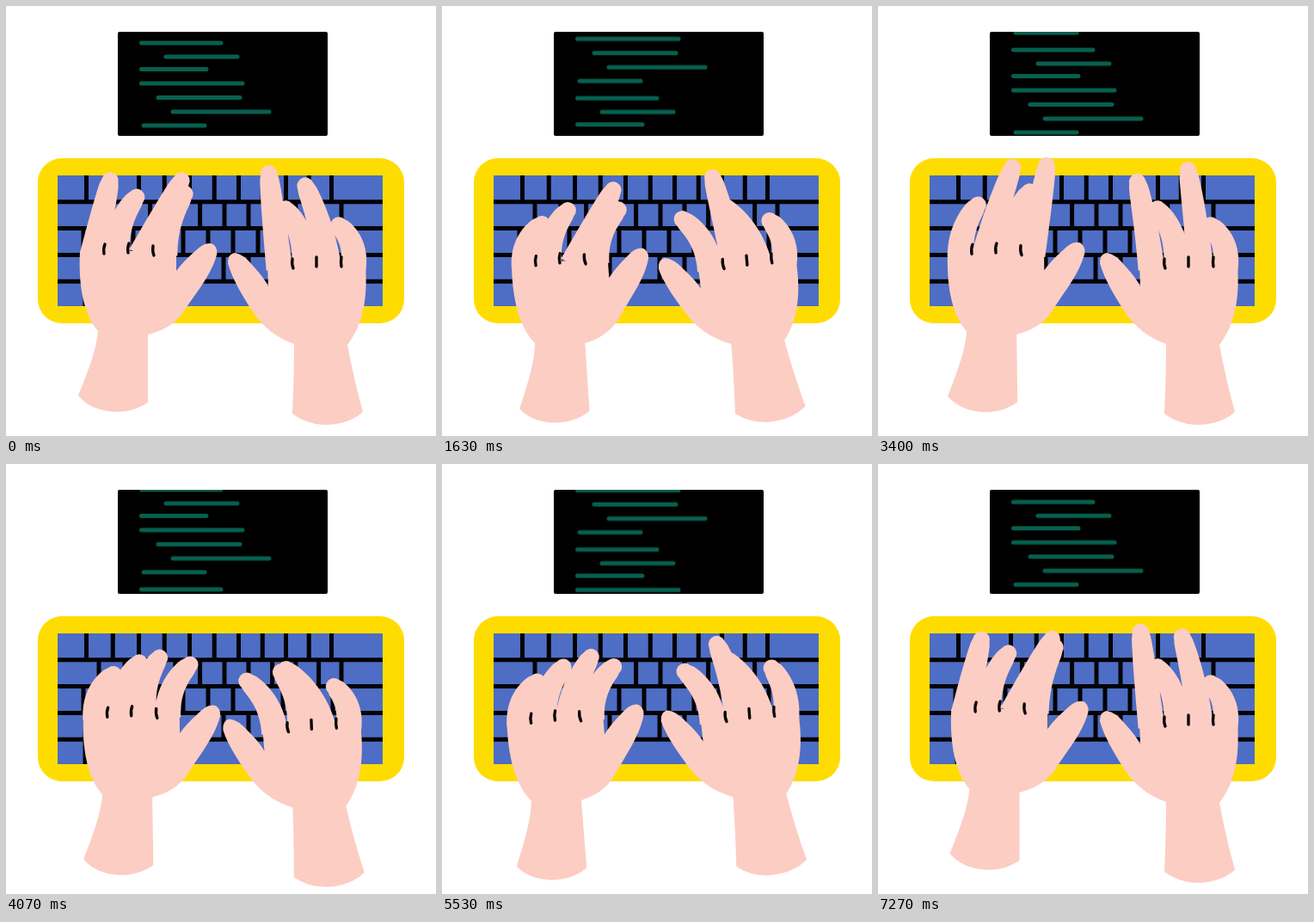
Recreate the animation shown at these times as an HTML page. Size 500x500 px, loop 7310 ms.

```html
<!DOCTYPE html>
<html lang="en">
<head>
<meta charset="utf-8">
<title>Typing hands</title>
<style>
  html, body { margin: 0; width: 100%; height: 100%; overflow: hidden; background: #fff; }
  svg { display: block; width: 100vw; height: 100vh; }
  .code { fill: none; stroke: #07604f; stroke-width: 5; stroke-linecap: round; animation: scroll 3655ms linear infinite; }
  .grid { fill: none; stroke: #020205; stroke-width: 5; }
  .hand { fill: #fccdc3; }
  .marks { fill: none; stroke: #0b0708; stroke-width: 3.4; stroke-linecap: round; }
  @keyframes scroll { to { transform: translateY(-116px); } }
</style>
</head>
<body>
<svg viewBox="0 0 500 500">
  <clipPath id="screen"><rect x="130" y="30" width="244" height="121" rx="2"/></clipPath>
  <g clip-path="url(#screen)">
    <rect x="130" y="30" width="244" height="121"/>
    <g class="code">
      <path id="code" d="M157.500 43H250M186 59H269M157.500 73.500H233M157.500 90H275M177 106.500H272M194 123H306M160 139H231"/>
      <use href="#code" y="116"/>
      <use href="#code" y="232"/>
    </g>
  </g>
  <rect x="37" y="177" width="426" height="192" rx="28" fill="#ffdc00"/>
  <rect x="60" y="197" width="378" height="152" fill="#4e6dc4"/>
  <path class="grid" id="grid"/>
  <g class="hand" id="left">
    <path class="fingers"/>
    <g class="palm">
      <path d="M86 285C84 325 90 358 107 378C105 400 96 423 84 453Q100 472 131 472Q151 471 165 461L165 382Q196 375 210 350C224 330 238 312 244 293Q248 283 241 277Q232 273 220 285Q206 297 198 308L198 285Z"/>
      <path class="marks" d="M115 277q-2 5-1 11M143 276q-2 5-1 11M171 279q-1 6 1 11"/>
    </g>
  </g>
  <g class="hand" id="right">
    <path class="fingers"/>
    <g class="palm">
      <path d="M418 302C421 342 414 372 397 394Q404 432 415 472Q398 487 370 487Q348 486 333 474Q335 430 335 393Q307 383 290 360C275 338 262 315 258 299Q258 288 266 287Q276 288 288 303Q300 316 305 326L304 300Z"/>
      <path class="marks" d="M333 294q-1 6 1 11M361 292v11M390 292q-1 6 0 11"/>
    </g>
  </g>
</svg>
<script>
  const LOOP = 3655;
  const TAP = 210; // how long a finger takes to stretch

  // path: time, x, y, angle. Each finger: base x, resting tip, stretch (both
  // relative to the base) and the times at which it is fully stretched.
  const HANDS = [
    {
      id: 'left', side: -1, pivot: [143, 283], baseY: 290,
      path: [[0, 0, 0, 0], [1000, 9, 14, -2], [2300, -20.5, 9.5, -5.8],
             [2715, -33, 5, -5.3], [3400, -5, 0, -.7], [LOOP, 0, 0, 0]],
      fingers: [
        { x: 101, rest: [20, -51], lift: [0, -36], peaks: [0, 1000] },
        { x: 129, rest: [22, -65], lift: [13, -47], peaks: [2300, 3300] },
        { x: 157, rest: [17, -70], lift: [30, -17], peaks: [0, 1650] },
        { x: 184, rest: [26, -62], lift: [-9, -42], peaks: [1000, 3400] }
      ]
    },
    {
      id: 'right', side: 1, pivot: [361.5, 298.5], baseY: 306,
      path: [[0, 0, 0, 0], [1000, -14, 13, -6], [2300, 1.5, -17.5, -3.3],
             [2715, 1.5, -12.5, -1.8], [3400, 0, 0, 0], [LOOP, 0, 0, 0]],
      fingers: [
        { x: 318, rest: [-33, -60], lift: [20, -50], peaks: [0, 2350, 3250] },
        { x: 347, rest: [-22, -70], lift: [-5, -40], peaks: [1000, 1700] },
        { x: 375, rest: [-44, -72], lift: [34, -50], peaks: [3480] },
        { x: 403, rest: [-16, -51], lift: [-4, -46], peaks: [2160, 2700] }
      ]
    }
  ];

  const $ = id => document.getElementById(id);

  // Keys get slightly narrower towards the right
  function drawGrid() {
    const top = 197, pitch = 30.8;
    const rows = [[93.5, 31, .25], [108, 30.2, .2], [90, 29, 0], [108, 29, 0]];
    let d = `M92 320V349M410 290V349M92 290V320`;
    rows.forEach(([x, step, shrink], r) => {
      const y = top + pitch * r;
      d += `M60 ${y + pitch}H438`;
      for (let i = 0; i < (r < 3 ? 11 : 9); i++)
        d += `M${x + step * i - shrink * i * i} ${y}v${pitch}`;
    });
    $('grid').setAttribute('d', d);
  }

  // Tapered outline along a quadratic curve with a round tip
  function outline(bx, by, tx, ty, bend) {
    const len = Math.hypot(tx - bx, ty - by);
    const cx = (bx + tx) / 2 - (ty - by) / len * bend;
    const cy = (by + ty) / 2 + (tx - bx) / len * bend;
    const a = [], b = [], n = 16, tip = 9.7;
    for (let i = 0; i <= n; i++) {
      const u = i / n, v = 1 - u, r = tip + 5.7 * Math.sqrt(v);
      const x = v * v * bx + 2 * u * v * cx + u * u * tx;
      const y = v * v * by + 2 * u * v * cy + u * u * ty;
      const dx = v * (cx - bx) + u * (tx - cx), dy = v * (cy - by) + u * (ty - cy);
      const k = r / Math.hypot(dx, dy);
      a.push(`${x + dy * k} ${y - dx * k}`);
      b.unshift(`${x - dy * k} ${y + dx * k}`);
    }
    return `M${a.join('L')}A${tip} ${tip} 0 0 1 ${b.join('L')}Z`;
  }

  // How far a finger is stretched, wrapping around the loop
  function stretch(t, peaks) {
    return peaks.reduce((sum, p) => {
      const gap = Math.abs(t - p), near = Math.min(gap, LOOP - gap);
      return sum + Math.exp(-((near / TAP) ** 2));
    }, 0);
  }

  function place(path, t) {
    const i = path.findIndex(p => p[0] > t), a = path[i - 1], b = path[i];
    const u = (t - a[0]) / (b[0] - a[0]);
    return a.map((v, k) => v + (b[k] - v) * u).slice(1);
  }

  function drawHand({ id, side, pivot: [px, py], baseY, path, fingers }, t) {
    const [x, y, deg] = place(path, t);
    const cos = Math.cos(deg * Math.PI / 180), sin = Math.sin(deg * Math.PI / 180);
    const d = fingers.map(f => {
      const ox = f.x - px, oy = baseY - py;
      const bx = px + x + ox * cos - oy * sin, by = py + y + ox * sin + oy * cos;
      const s = stretch(t, f.peaks);
      const tx = bx + f.rest[0] + f.lift[0] * s, ty = by + f.rest[1] + f.lift[1] * s;
      return outline(bx, by, tx, ty, side * 15 * Math.max(0, 1 - s));
    });
    const g = $(id);
    g.querySelector('.fingers').setAttribute('d', d.join(''));
    g.querySelector('.palm').setAttribute('transform',
      `translate(${x} ${y}) rotate(${deg} ${px} ${py})`);
  }

  let start;
  function frame(now) {
    start ??= now;
    HANDS.forEach(hand => drawHand(hand, (now - start) % LOOP));
    requestAnimationFrame(frame);
  }

  drawGrid();
  requestAnimationFrame(frame);
</script>
</body>
</html>
```
